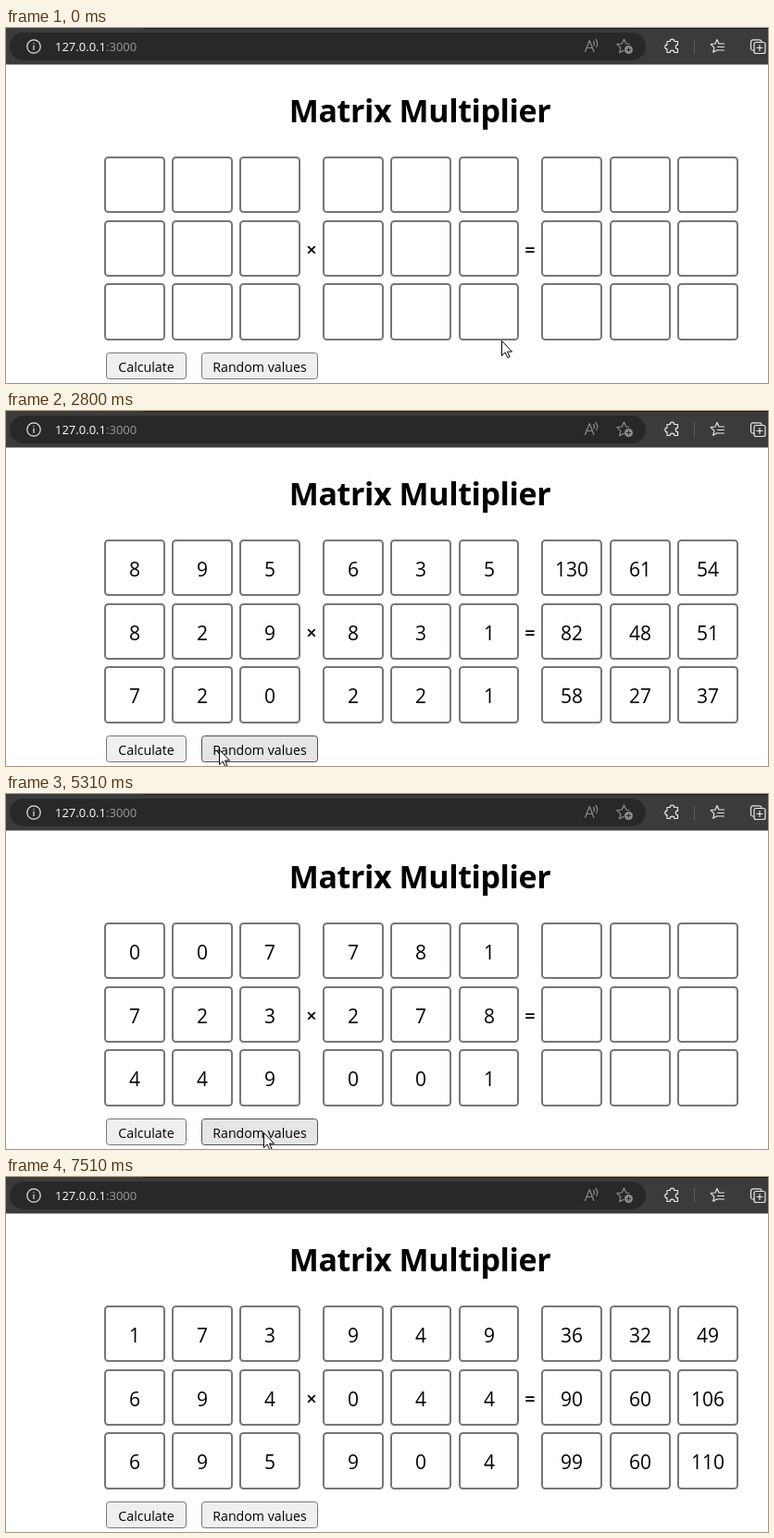
An HTML page for the animation above (8170 ms loop, 823 by 384 pixels).

```html
<!DOCTYPE html>
<html lang="en">
<head>
<meta charset="utf-8">
<title>Matrix Multiplier</title>
<style>
  html, body { margin: 0; width: 100%; height: 100%; overflow: hidden; background: #fff; }
  svg { display: block; width: 823px; height: 384px; }
  text { font-family: "Open Sans", "Noto Sans", sans-serif; fill: #000; }
  .title { font-size: 34px; font-weight: 700; letter-spacing: -.012em; }
  .mid { text-anchor: middle; }
  .num { font-size: 21px; }
  .op { font-size: 20px; font-weight: 600; }
  .label { font-size: 14.2px; }
  .url { font-size: 13px; fill: #fff; }
  .url tspan { fill: #9a9a9a; }
  .icon { fill: none; stroke: #e8e8e8; stroke-width: 1.2; stroke-linejoin: round; stroke-linecap: round; }
  .dim { stroke: #8c8c8c; }
  .cell { fill: #fff; stroke: #767676; stroke-width: 2; }
  .button { fill: #efefef; stroke: #767676; }
  .button.hover { fill: #e5e5e5; stroke: #4f4f4f; }
  .button.press { fill: #f5f5f5; stroke: #8d8d8d; }
</style>
</head>
<body>
<svg viewBox="0 0 823 384">
  <rect width="823" height="39.5" fill="#3b3b3b"/>
  <rect x="148" width="675" height="1" fill="#1c1c1c"/>
  <rect x="4" y="5" width="687" height="30" rx="15" fill="#282828"/>
  <g class="icon">
    <circle cx="30" cy="20" r="7.2"/>
    <path d="M30 19v4.5M30 16.4v.2"/>
    <g class="dim">
      <path d="M625.5 25.5l4.7-12 4.7 12M627 21.5h6.4M634.5 14.5q1.8 2 .3 4.5M637 12.5q3.2 3.8.6 8"/>
      <path d="M673 17.5l-3.2-.5-2.3-5-2.3 5-5.4.6 4 3.8-1.2 5.4 4.4-2.4"/>
    </g>
    <path d="M714 14.5h3.2a2.3 2.3 0 0 1 4.6 0h3.7v3.7a2.2 2.2 0 0 0 0 4.4v3.9h-3.7a2.3 2.3 0 0 0-4.6 0H714v-3.9a2.2 2.2 0 0 1 0-4.4z"/>
    <path d="M743.5 12.5v15" stroke="#5c5c5c"/>
    <path d="M775.5 17H770l-2-4.5-2 4.5-4.8.6 3.6 3.5-1 5.2 4.2-2.5M768.5 20.5h7M768.5 24h7"/>
    <path d="M808 24h-1.5q-1.5 0-2-1.6v-7q0-2.4 2.2-2.6h7q2 0 2.4 1.7"/>
    <rect x="808" y="15.5" width="12" height="12" rx="2"/>
    <path d="M814 18.5v6M811 21.5h6"/>
  </g>
  <circle cx="672.5" cy="23.5" r="4.5" fill="#8c8c8c"/>
  <path d="M670 23.5h5M672.5 21v5" stroke="#282828"/>
  <text class="url" x="53" y="24.5">127.0.0.1<tspan>:3000</tspan></text>

  <text class="title mid" x="447" y="102">Matrix Multiplier</text>
  <g id="cells"></g>
  <text class="op mid" x="330" y="247">×</text>
  <text class="op mid" x="566" y="247">=</text>
  <g id="buttons"></g>
  <path id="arrow" d="M.5.5v16l3.7-3.5 2.5 5.6 2.3-1-2.5-5.5h5z" fill="#fff" stroke="#000"/>
</svg>
<script>
const LOOP = 8170;
const STEP = LOOP / 123;
const PRESS = 70;
const $ = id => document.getElementById(id);

function add(parent, tag, attrs, text = '') {
  const node = document.createElementNS('http://www.w3.org/2000/svg', tag);
  for (const name in attrs) node.setAttribute(name, attrs[name]);
  node.textContent = text;
  return parent.appendChild(node);
}

// A bordered box whose outer edges snap to whole pixels.
function addBox(parent, kind, border, x, y, w, h, rx) {
  const left = Math.floor(x), top = Math.floor(y);
  const right = Math.floor(x + w), bottom = Math.floor(y + h);
  const node = add(parent, 'rect', {
    class: kind, rx, x: left + border / 2, y: top + border / 2,
    width: right - left - border, height: bottom - top - border
  });
  return { node, contains: (px, py) => px >= left && px < right && py >= top && py < bottom };
}

// Nine cells for each of the two factors and the product.
const cellTexts = Array.from({ length: 27 }, (_, i) => {
  const matrix = Math.floor(i / 9), row = Math.floor(i % 9 / 3), col = i % 3;
  const x = 106.1 + 236.36 * matrix + 73.3 * col;
  const y = 139.3 + 68.7 * row;
  addBox($('cells'), 'cell', 2, x, y, 65.92, 61.35, 3.5);
  return add($('cells'), 'text', { class: 'num mid', x: Math.floor(x) + 33, y: Math.floor(y) + 40 });
});

function addButton(x, width, label) {
  add($('buttons'), 'text', { class: 'label mid', x: x + width / 2, y: 372 }, label);
  const box = addBox($('buttons'), 'button', 1, x, 351, width, 29, 3);
  $('buttons').prepend(box.node);
  return box;
}
const buttons = [addButton(108, 87, 'Calculate'), addButton(211, 126, 'Random values')];

// Each round fills both factors at one time and shows the product at another.
const rounds = [
  { filled: 1130, solved: 2530, factors: '895 829 720  635 831 221' },
  { filled: 3590, solved: 4330, factors: '635 657 448  220 721 297' },
  { filled: 5300, solved: 5850, factors: '007 723 449  781 278 001' },
  { filled: 6520, solved: 7180, factors: '173 694 695  949 044 904' }
];

function multiply(d) {
  return Array.from({ length: 9 }, (_, i) => {
    const row = i - i % 3, col = 9 + i % 3;
    return [0, 1, 2].reduce((sum, k) => sum + d[row + k] * d[col + 3 * k], 0);
  });
}

function valuesAt(t) {
  const round = rounds.filter(r => t >= r.filled).pop();
  if (!round) return [];
  const digits = [...round.factors.replaceAll(' ', '')];
  return t >= round.solved ? [...digits, ...multiply(digits)] : digits;
}

const start = { x: 535, y: 338 };
const moves = [
  { from: 10, to: 660, x: 262, y: 365 },
  { from: 1340, to: 1530, x: 153, y: 369 },
  { from: 2530, to: 2800, x: 230, y: 366 },
  { from: 3930, to: 4190, x: 155, y: 361 },
  { from: 4530, to: 4790, x: 597, y: 366 },
  { from: 4790, to: 4990, x: 278, y: 366 },
  { from: 5400, to: 5580, x: 158, y: 366 },
  { from: 6060, to: 6450, x: 244, y: 363 },
  { from: 6600, to: 6910, x: 156, y: 366 },
  { from: 7180, to: 7510, x: 300, y: 390 }
];
const ease = k => k * k * (3 - 2 * k);

function pointerAt(t) {
  let { x, y } = start;
  for (const move of moves) {
    const k = ease(Math.min(1, Math.max(0, (t - move.from) / (move.to - move.from))));
    x += (move.x - x) * k;
    y += (move.y - y) * k;
  }
  return [Math.round(x), Math.round(y)];
}

function draw(t) {
  const values = valuesAt(t);
  cellTexts.forEach((text, i) => { text.textContent = values[i] ?? ''; });

  // The pointer is only sampled once per step.
  const [x, y] = pointerAt(Math.floor((t + 8) / STEP) * STEP);
  $('arrow').setAttribute('transform', `translate(${x} ${y})`);

  const pressed = rounds.some(r => [r.filled, r.solved].some(at => t >= at - PRESS && t < at));
  for (const { node, contains } of buttons) {
    const hover = contains(x, y);
    node.classList.toggle('hover', hover);
    node.classList.toggle('press', hover && pressed);
  }
}

const began = performance.now();
(function frame() {
  draw((performance.now() - began) % LOOP);
  requestAnimationFrame(frame);
})();
</script>
</body>
</html>
```
